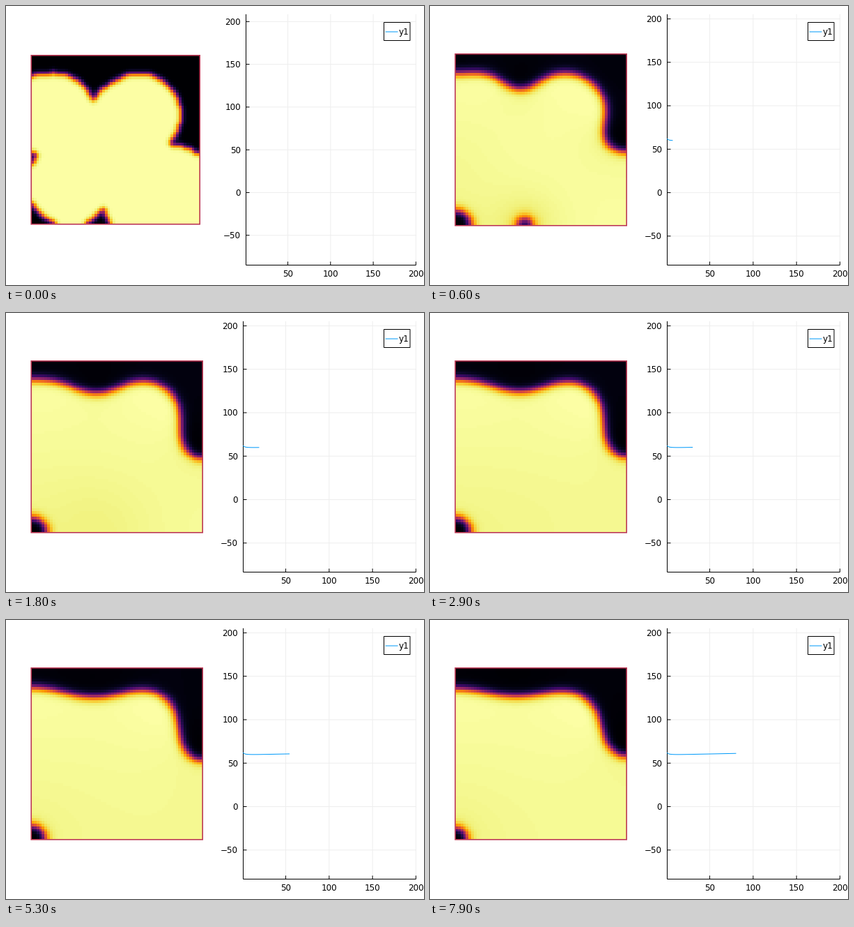
Write a matplotlib script that moves like this. It is 600 by 400 pixels and loops after 8 s.

```python
import numpy as np
import matplotlib.pyplot as plt
from matplotlib.animation import FuncAnimation
from matplotlib.collections import LineCollection
from matplotlib.patches import Rectangle

W, H, DPI = 600, 400, 100
N, FRAMES, SUBSTEPS = 64, 80, 30
PX = 72 / DPI
BLUE = "#009afa"
FONT = dict(family="DejaVu Sans", fontsize=12 * PX, va="baseline")

plt.rcParams["path.snap"] = False

# Discs (x, y, radius), in stage pixels, whose union is the starting blob
DISCS = [(68, 156.5, 61), (50, 150, 52), (191, 156.5, 60), (178, 164, 60),
         (238, 259, 60.5), (205, 278, 65), (260, 290, 60), (91, 255, 60.5),
         (140, 200, 55)]


def disc_union():
    c = (np.arange(N) + 0.5) * 242 / N
    x, y = np.meshgrid(36 + c, 71 + c)
    inside = [np.hypot(x - a, y - b) < r for a, b, r in DISCS]
    return np.any(inside, axis=0).astype(float)


def phase_fields(mobility=7.4, width=1.7, stab=2.0, blur=1.0):
    """Cahn-Hilliard flow with no-flux walls, semi-implicit in cosine space."""
    k = np.arange(N)
    dct = np.sqrt(2 / N) * np.cos(np.pi * np.outer(k, k + 0.5) / N)
    dct[0] /= np.sqrt(2)
    lam = 2 - 2 * np.cos(np.pi * k / N)
    k2 = lam[:, None] + lam[None, :]
    a = mobility / SUBSTEPS * k2
    denom = 1 + a * (stab + width ** 2 / 2 * k2)
    soften = np.exp(-k2 * blur ** 2 / 2)
    u = dct.T @ (soften * (dct @ disc_union() @ dct.T)) @ dct
    fields = [u]
    for _ in range(FRAMES - 1):
        for _ in range(SUBSTEPS):
            force = 2 * u * (1 - u) * (1 - 2 * u) - stab * u
            spec = (dct @ u @ dct.T - a * (dct @ force @ dct.T)) / denom
            u = dct.T @ spec @ dct
        fields.append(u)
    return fields


fields = phase_fields()
t = np.arange(FRAMES)
curve = 59.55 + 0.021 * t + 1.3 * np.exp(-t / 1.5) + np.exp(-t / 6)

TOP, BOTTOM, RIGHT = 11.8, 371.5, 588.4
MID = (TOP + BOTTOM) / 2
XT = [50, 100, 150, 200]
YT = [-50, 0, 50, 100, 150, 200]

fig = plt.figure(figsize=(W / DPI, H / DPI), dpi=DPI, facecolor="white")
ax = fig.add_axes([0, 0, 1, 1])
ax.axis("off")

heat = ax.imshow(fields[0], cmap="inferno", interpolation="nearest",
                 extent=(36, 278, 313, 71), aspect="auto", zorder=1)
ax.set_xlim(0, W)
ax.set_ylim(H, 0)
ax.set_autoscale_on(False)
frame = ax.add_patch(Rectangle((0, 0), 1, 1, fill=False, ec="#bc3754",
                               lw=1.6 * PX, zorder=2))
grid = ax.add_collection(LineCollection([], colors="#eeeeee",
                                        linewidths=PX, zorder=1))
axes = ax.add_collection(LineCollection([], colors="black",
                                        linewidths=PX, zorder=3))
line, = ax.plot([], [], color=BLUE, lw=PX, zorder=4)


def label(value, ha):
    text = str(value).replace("-", "\u2212")
    return ax.text(0, 0, text, ha=ha, zorder=5, **FONT)


xlabels = [label(v, "center") for v in XT]
ylabels = [label(v, "right") for v in YT]

ax.add_patch(Rectangle((542.5, 23.5), 37.5, 26, fc="white", ec="black",
                       lw=PX, zorder=6))
ax.plot([545, 562], [37, 37], color=BLUE, lw=PX, zorder=7)
ax.text(564, 41.2, "y1", zorder=7, **FONT)


def update(i):
    # Wider tick labels squeeze both panels at the start
    x0, side, top = (344.5, 242, 71) if i < 4 else (340.5, 246, 69)
    scale = (RIGHT - x0) / 199
    seen = curve[:i + 1]
    centre = (seen.max() + seen.min()) / 2

    def px(x):
        return x0 + (x - 1) * scale

    def py(y):
        return MID - (y - centre) * scale

    u = fields[i]
    heat.set_data(u)
    heat.set_clim(u.min(), u.max())
    heat.set_extent((36, 36 + side, top + side, top))
    frame.set_bounds(36.2, top - 0.2, side, side)

    xs = [px(v) for v in XT]
    ys = [py(v) for v in YT]
    grid.set_segments([[(x, TOP), (x, BOTTOM)] for x in xs]
                      + [[(x0, y), (RIGHT, y)] for y in ys])
    axes.set_segments([[(x0, TOP), (x0, BOTTOM)],
                       [(x0, BOTTOM), (RIGHT, BOTTOM)]]
                      + [[(x, BOTTOM), (x, BOTTOM - 5)] for x in xs]
                      + [[(x0, y), (x0 + 5, y)] for y in ys])
    for lab, x in zip(xlabels, xs):
        lab.set_position((x, 387.5))
    for lab, y in zip(ylabels, ys):
        lab.set_position((x0 - 7.5, y + 4.4))
    line.set_data(px(t[:i + 1] + 1), py(seen))
    return heat, frame, grid, axes, line, *xlabels, *ylabels


anim = FuncAnimation(fig, update, frames=FRAMES, interval=100, repeat=True,
                     repeat_delay=0, blit=False)
plt.show()
```
